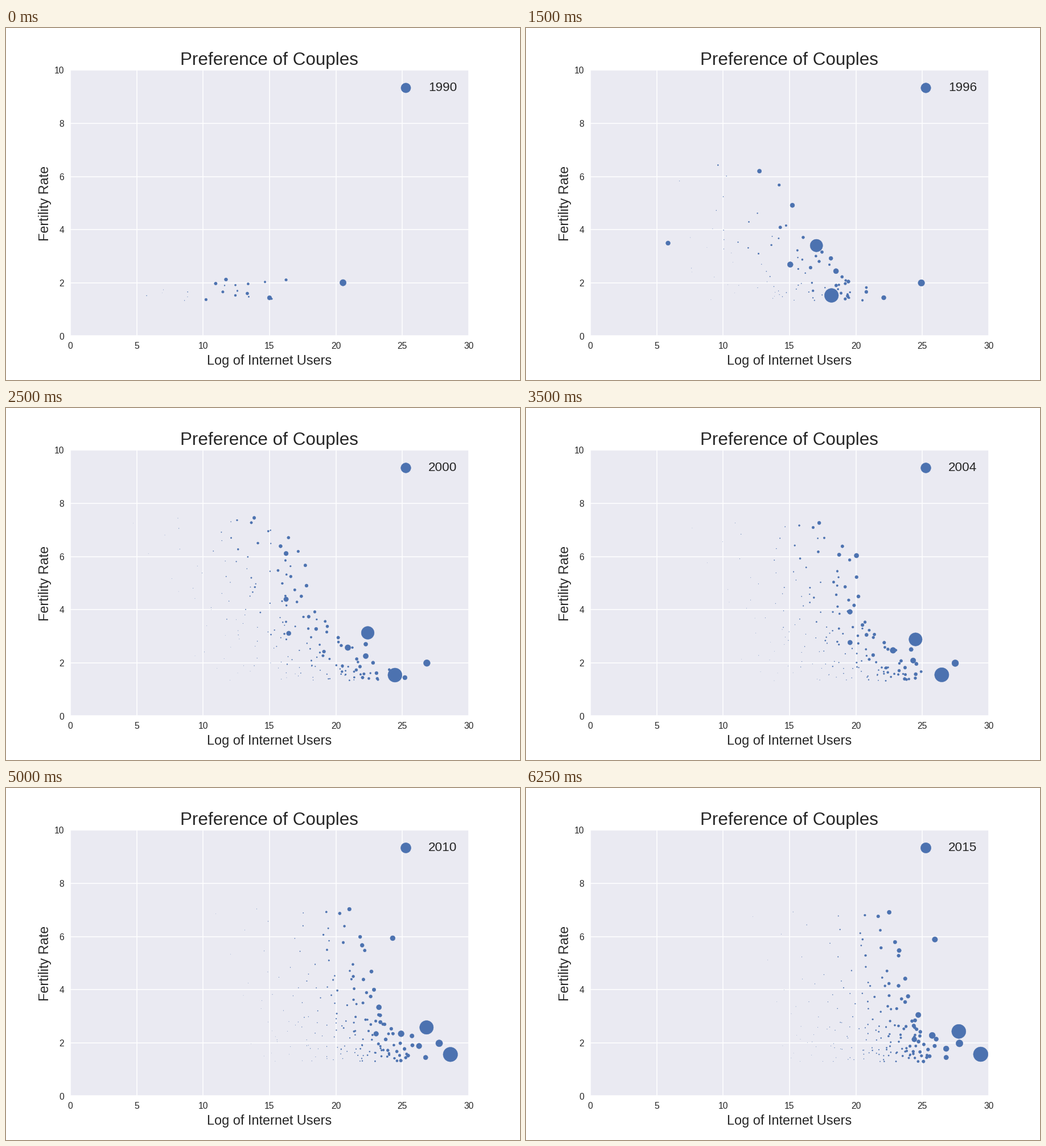
These frames come from a looping animation (903 px wide and 620 px high, 6500 ms). A matplotlib script:

```python
import numpy as np
import matplotlib.pyplot as plt
from matplotlib.animation import FuncAnimation

W, H, DPI = 903, 620, 112.875
BLUE, PANEL, INK = "#4C72B0", "#EAEAF2", "0.15"
YEARS = np.arange(1990, 2016)
CROWD = 172

# population in millions, log2 of users in 1994, 2000, 2015, fertility in 1994, 2015
GIANTS = {
    "China": (1262, 13.8, 24.45, 29.4, 1.52, 1.57),
    "India": (1053, 13.3, 22.4, 27.75, 3.55, 2.43),
    "United States": (282, 23.6, 26.85, 27.8, 2.0, 1.98),
    "Indonesia": (211, 11.0, 20.9, 25.75, 2.75, 2.28),
    "Brazil": (175, 15.9, 22.25, 26.8, 2.54, 1.78),
    "Japan": (127, 19.95, 25.2, 26.8, 1.44, 1.45),
    "Nigeria": (122, 10.3, 16.25, 25.95, 6.25, 5.89),
    "Pakistan": (138, 14.5, 16.25, 24.7, 5.2, 3.05),
    "Bangladesh": (131, -1.5, 16.45, 24.4, 3.7, 2.13),
    "Mexico": (103, 15.25, 22.25, 26.05, 3.04, 2.14),
}


def track(pop, x94, x00, x15, y94, y15, start):
    """Yearly x, y and marker area; x is nan while a country is offline."""
    gap = np.log2(pop * 1e6) - x00
    power = max(1.6, 4 - 0.4 * gap)
    left = (2015 - YEARS).astype(float)
    rise = x00 - (x00 - x94) * (np.maximum(2000 - YEARS, 0) / 6) ** 1.3
    settle = x15 - (x15 - x00) * (left / 15) ** power
    x = np.where(YEARS < 2000, rise, settle)
    x[(YEARS < start) | (x < 3)] = np.nan
    y = y15 + (y94 - y15) * (left / 21) ** 1.4
    growth = 1 + 0.005 * (y.mean() - 0.5)
    return x, y, pop * growth ** (YEARS - 2000) / 5


def giant(pop, x94, x00, x15, y94, y15):
    rich = np.log2(pop * 1e6) - x94 < 9
    start = 1990 if rich else 1996 if y94 > 4.5 else 1993
    return track(pop, x94, x00, x15, y94, y15, start)


def crowd(count, rng):
    """Ranked by population; the higher the fertility, the later online."""
    for rank in range(count):
        pop = 75 * np.exp(-0.025 * rank - (rank / 130) ** 4)
        u = (0.29 + rank * 0.618034) % 1
        n = rng.normal(size=3)
        full = np.log2(pop * 1e6)
        x94 = full - 6.5 - 9 * u + 1.4 * n[0]
        x00 = full - 2 - 8.5 * u + 0.5 * n[0] + 0.8 * n[1]
        x15 = full - 0.4 - 2.8 * u ** 2 + 0.3 * n[1]
        shares = (0, 0.3, 0.62, 0.85, 1)
        y94 = np.interp(u, shares, (1.3, 2.1, 4.3, 6.4, 7.8))
        y15 = np.interp(u, shares, (1.35, 1.75, 2.75, 4.4, 7)) + 0.12 * n[2]
        delay = 0.55 * u + 0.45 * rng.random()
        start = np.interp(delay, (0.21, 0.33, 0.5, 0.685, 1), (1990, 1994, 1996, 1998, 2000))
        yield track(pop, x94, x00, x15, y94, max(y15, 1.3), start)


tracks = [giant(*row) for row in GIANTS.values()]
tracks += crowd(CROWD, np.random.default_rng(11))
X, Y, AREA = np.array(tracks).transpose(1, 0, 2)

plt.rcParams.update({"font.family": "Liberation Sans", "text.color": INK,
                     "axes.labelcolor": INK, "xtick.color": INK, "ytick.color": INK})
fig = plt.figure(figsize=(W / DPI, (H + 0.001) / DPI), dpi=DPI, facecolor="white")
ax = fig.add_axes([113 / W, 0.125, 0.775, 0.755], facecolor=PANEL)
ax.set_axisbelow(True)
ax.grid(color="white", lw=1)
ax.spines[:].set_visible(False)
ax.tick_params(length=0, pad=7, labelsize=10)
ax.set_title("Preference of Couples", fontsize=20, pad=6)
ax.set_xlabel("Log of Internet Users", fontsize=15, labelpad=4)
ax.set_ylabel("Fertility Rate", fontsize=15, labelpad=3)

dot = dict(c=BLUE, edgecolors="face", linewidths=0.3, zorder=3)
dots = ax.scatter(X[:, 0], Y[:, 0], s=AREA[:, 0], **dot)
key = ax.scatter([701.5 / W], [1 - 105 / H], transform=fig.transFigure, **dot)
label = fig.text(741.8 / W, 1 - 111 / H, "", fontsize=14.4, va="baseline")
ax.set(xlim=(0, 30), ylim=(0, 10))


def update(i):
    dots.set_offsets(np.c_[X[:, i], Y[:, i]])
    dots.set_sizes(AREA[:, i])
    key.set_sizes([AREA[:, i].max() / 2])
    label.set_text(str(YEARS[i]))
    return dots, key, label


anim = FuncAnimation(fig, update, frames=len(YEARS), interval=250, repeat=True, repeat_delay=0)
plt.show()
```
